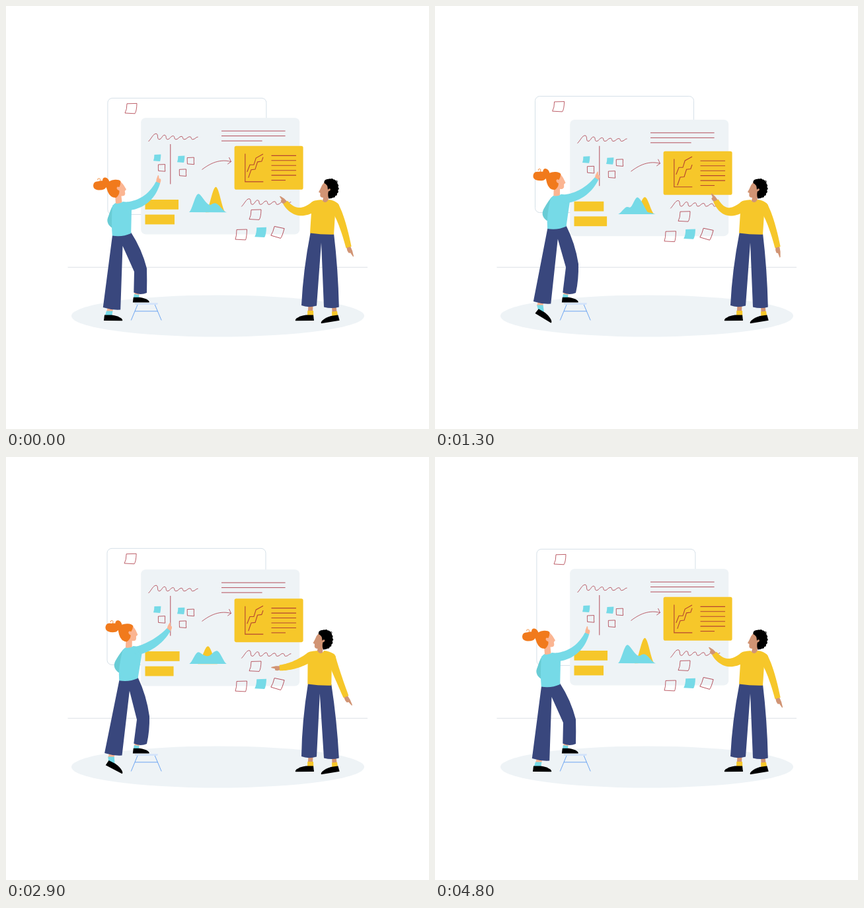
Animation, 640 px wide and 640 px high, one loop 4.9 s. Source, as an HTML page with a canvas:

```html
<!DOCTYPE html>
<html lang="en">
<head>
<meta charset="utf-8">
<title>Whiteboard session</title>
<style>
html, body { margin: 0; width: 100%; height: 100%; overflow: hidden; background: #fff; }
canvas { display: block; width: 640px; height: 640px; }
</style>
</head>
<body>
<canvas id="stage"></canvas>
<script>
const LOOP = 4900, SPAN = 4800, STEP = 100, RAD = Math.PI / 180;
const CYAN = '#76dae7', TEAL = '#69ccd5', NAVY = '#39477d', YELLOW = '#f6c72a', ORANGE = '#f17a1c';
const PEACH = '#fbb592', BROWN = '#d19474', PALE = '#eef3f6', INK = 'rgba(165,35,50,.8)';

const canvas = document.getElementById('stage');
const ctx = canvas.getContext('2d');
const ratio = window.devicePixelRatio || 1;
canvas.width = canvas.height = 640 * ratio;

const KEYS = [0, 400, 900, 1700, 2500, 2900, 3700, 4200];

// Periodic monotone spline through one value per key time.
function curve(...v) {
  const n = KEYS.length;
  const time = j => KEYS[(j + n) % n] + SPAN * Math.floor(j / n);
  const val = j => v[(j + n) % n];
  const slope = j => (val(j + 1) - val(j)) / (time(j + 1) - time(j));
  const tangent = j => {
    const a = slope(j - 1), b = slope(j);
    return a * b <= 0 ? 0 : 2 * a * b / (a + b);
  };
  return t => {
    t %= SPAN;
    const i = KEYS.filter(k => k <= t).length - 1;
    const d = time(i + 1) - time(i), s = (t - time(i)) / d, r = 1 - s;
    return val(i) * r * r * (1 + 2 * s) + val(i + 1) * s * s * (3 - 2 * s)
      + d * s * r * (tangent(i) * r - tangent(i + 1) * s);
  };
}

// Woman: leaning forward, rising on the toes
const lean = curve(0, -.2, .2, 1, .92, .77, .46, .4);
const rise = curve(0, -.04, .46, 1, 1, .72, .19, .05);
// Man: stepping toward the board, angle of the pointing forearm
const shift = curve(0, -.05, -.13, .22, .57, .74, 1, .6);
const raise = curve(34, 42, 53, 24, -13, -12, 6, 18);
// Chart: heights of the hills, place of the right one, growth of the bars
const leftHill = curve(28, 20, 11, 11, 17, 18, 21, 25);
const rightHill = curve(14, 17, 21, 26, 17, 20, 21, 18);
const rightSpot = curve(316, 311, 307, 307, 312, 319, 320, 318);
const backHill = curve(38.5, 34, 28, 24.5, 23, 27, 27.7, 33);
const growth = curve(0, 0, -1, -9.7, -1.7, 1.6, -1, 0);

const wave = t => (1 - Math.cos(2 * Math.PI * t / 2400)) / 2;
const ease = (a, b, t) => {
  const s = Math.max(0, Math.min(1, (t - a) / (b - a)));
  return s * s * (3 - 2 * s);
};
const bell = (x, a, c, b) => x < c ? ease(a, c, x) : ease(b, c, x);

function fill(color) { ctx.fillStyle = color; ctx.fill(); }
function stroke(color, width = 1) { ctx.strokeStyle = color; ctx.lineWidth = width; ctx.stroke(); }

function trace(...xy) {
  ctx.beginPath();
  for (let i = 0; i < xy.length; i += 2) ctx.lineTo(xy[i], xy[i + 1]);
}
function poly(color, ...xy) { trace(...xy); fill(color); }
function line(color, width, ...xy) { trace(...xy); stroke(color, width); }
function shape(d, color) { ctx.fillStyle = color; ctx.fill(new Path2D(d)); }
function sketch(d, color, width) {
  ctx.strokeStyle = color;
  ctx.lineWidth = width;
  ctx.stroke(new Path2D(d));
}
function ellipse(color, x, y, rx, ry = rx) {
  ctx.beginPath();
  ctx.ellipse(x, y, rx, ry, 0, 0, 7);
  fill(color);
}
function box(x, y, w, h, r) { ctx.beginPath(); ctx.roundRect(x, y, w, h, r); }

// Draws with the origin moved to x, y and turned.
function place(x, y, deg, draw) {
  ctx.save();
  ctx.translate(x, y);
  ctx.rotate(deg * RAD);
  draw();
  ctx.restore();
}

// Tapered arm through an elbow, with a rounded shoulder.
function limb(color, ax, ay, ex, ey, cx, cy, w0, w1, w2) {
  const bx = 2 * ex - (ax + cx) / 2, by = 2 * ey - (ay + cy) / 2;
  const left = [], right = [];
  for (let i = 0; i <= 24; i++) {
    const s = i / 24, r = 1 - s;
    const mix = (a, b, c) => a * r * r + 2 * b * r * s + c * s * s;
    const dx = (bx - ax) * r + (cx - bx) * s, dy = (by - ay) * r + (cy - by) * s;
    const k = mix(w0, w1, w2) / 2 / Math.hypot(dx, dy);
    const x = mix(ax, bx, cx), y = mix(ay, by, cy);
    left.push(x - dy * k, y + dx * k);
    right.unshift([x + dy * k, y - dx * k]);
  }
  ellipse(color, ax, ay, w0 / 2);
  poly(color, ...left, ...right.flat());
}

function hand(color, x, y, deg, len, side) {
  place(x, y, deg, () => {
    ctx.scale(1, side);
    poly(color, -2, -3, len * .45, -2.6, len - .6, -.9, len, .3, len * .55, 1.4, len * .5, 3.8, len * .25, 4.2, -2, 3);
  });
}

function shoe(x, y, deg, sx, sy = 1) {
  place(x, y, deg, () => {
    ctx.scale(sx, sy);
    shape('M-23-8.7L-12-8.8Q-3-7.500 2-4Q5-1.500 4 0L-24-.2Z', '#000');
  });
}

function sheet(x, y, s, skew, color, deg = 0) {
  place(x, y, deg, () => {
    ctx.beginPath();
    ctx.moveTo(skew, 0);
    ctx.lineTo(skew + s, -.4);
    ctx.quadraticCurveTo(skew + s - .3, s * .75, s, s);
    ctx.lineTo(0, s - .8);
    ctx.quadraticCurveTo(skew, s * .6, skew, 0);
    ctx.closePath();
    if (color) fill(color); else stroke(INK, .9);
  });
}

// A rising stroke that dies away in ripples.
function scribble(x, y) {
  ctx.beginPath();
  ctx.moveTo(x, y + 12);
  ctx.bezierCurveTo(x + 5, y + 7, x + 7, y + .5, x + 11.5, y + .2);
  for (let i = 0; i < 5; i++) {
    const px = x + 11.5 + 12.7 * i, dip = px + 4.8;
    const top = y + 5.5 - 5.3 * .6 ** i, next = y + 5.5 - 3.2 * .6 ** i;
    ctx.bezierCurveTo(px + 4, top, px + 1, y + 8.8, dip, y + 8.8);
    ctx.bezierCurveTo(dip + 3.5, y + 8.8, px + 9.5, next, px + 12.7, next);
  }
  stroke(INK, .9);
}

function drawBoards(t) {
  const k = wave(t), p = wave(t - 60);
  line('#dde1e6', 1, 93.5, 395.3, 547, 395.3);
  ellipse(PALE, 320.5, 469, 221.5, 31.5);

  place(-2.4 * k, -2.9 * k, 0, () => {
    box(153.9, 139.4, 240, 176, 7);
    fill('#fff');
    stroke('#d5e0e8', 1);
    sheet(180, 147.8, 15, 3);
  });

  place(0, 2.8 * k, 0, () => {
    box(204.2, 169.2, 240, 176.2, 7);
    fill(PALE);
    scribble(215.5, 193);
    scribble(356.3, 291.5);
    for (let i = 0; i < 3; i++) line(INK, 1, 326, 189.1 + 7.5 * i, i < 2 ? 422.6 : 387.6, 189.1 + 7.5 * i);
    line(INK, 1, 248.8, 209, 248.8, 269.5);
    sketch('M296.5 247.5C304 242 320 230 340.5 235.5M337.5 229L340.5 235.5L335.3 239.2', INK, .9);
    sheet(223, 225, 10, 1.4, CYAN);
    sheet(259, 227, 10, 1.4, CYAN);
    sheet(230.6, 240, 10.2, -.2);
    sheet(274.4, 229.5, 10.2, -.2);
    sheet(262.5, 247.3, 10.2, -.2);
    sheet(368, 308.4, 15, 3);
    sheet(347, 338.4, 15.5, 2);
    sheet(376.2, 335.2, 14.8, 3, CYAN);
    sheet(404.2, 333, 15.3, 2, null, 13.5);
  });

  place(0, 8 * p, 0, () => {
    box(345.6, 211.8, 104, 66, 2.8);
    fill(YELLOW);
    for (let i = 0; i < 6; i++) {
      const y = 226.3 + 7.45 * i;
      line(INK, 1.1, 401.5, y, i < 5 ? 439 : 423, y);
    }
    line(INK, 1.1, 361.8, 223.5, 361.8, 265.8, 389.3, 265.8);
    ctx.translate(0, -4 * p);
    line(INK, 1.1, 364.8, 251, 369, 240.3, 375, 240.3, 378.2, 230, 389, 224);
    ctx.translate(0, 7.5 * p);
    line(INK, 1.1, 366.7, 259.8, 371, 247.6, 377, 247, 380.5, 235.8, 386.8, 235, 389, 228.7);
  });
}

function hill(color, base, from, to, height) {
  ctx.beginPath();
  for (let x = from; x <= to; x += .5) ctx.lineTo(x, base - height(x));
  fill(color);
}

function drawChart(t) {
  const drop = 2.8 * wave(t), base = 312.3 + drop, grow = growth(t);
  ctx.fillStyle = YELLOW;
  ctx.fillRect(210.5, 293 + drop, 50.5 + grow, 14.8);
  ctx.fillRect(210.5, 315.6 + drop, 44.5 - .9 * grow, 14.8);

  const spot = 317.5 - 12 * (ease(1700, 2400, t) - ease(3700, 4700, t));
  const peak = rightSpot(t), a = leftHill(t), b = rightHill(t), c = backHill(t);
  hill(YELLOW, base, spot - 16, Math.min(331, spot + 16), x => c * bell(x, spot - 16, spot, spot + 15));
  hill(CYAN, base, 277, 334, x => Math.max(5 * Math.sin(Math.PI * (x - 277) / 57),
    a * bell(x, 276, 291, 311) + b * bell(x, 294, peak, Math.min(335, peak + 19))));
}

function drawStool() {
  poly('#d3e3fa', 194.5, 449.3, 230, 449.3, 229, 452, 195.5, 452);
  sketch('M199 452L189.3 475.5M225.3 452L235.2 475.5M195 461.8H229.6', '#609ff2', .9);
}

function womanHead(x, y, deg) {
  place(x, y, deg, () => {
    ctx.translate(-170, -293);
    shape('M165 286L166 299Q171 301 175.5 297L174.5 287.5Q180 288 180.3 284L179.8 280L182 277.5Q178 270 173 265L163 272Z', PEACH);
    shape('M151 271Q155 263.5 165 262.8Q171 262.5 173.3 265Q173.5 270 171.5 274Q167.5 272.5 167.5 276Q168.5 279 171.5 279.5Q172 286 166.5 290Q158 290.5 154 281Q152 276 151 271Z', ORANGE);
    shape('M132 271.5Q132.5 265 140 265.3Q145 264 146 264.5Q146 259 150.5 259.5Q155 260.5 156.5 266L155 271Q151 275 149 277Q143 279.5 137 278Q132 276.5 132 271.5Z', ORANGE);
    sketch('M142 265.5Q143.5 260.8 140.5 260.8Q137.8 261.3 139 263.5', ORANGE, .8);
  });
}

function drawWoman(t) {
  const l = lean(t), up = rise(t);
  const x = 170 + 20.3 * l, y = 293 - 14 * up;
  const hx = 175 + 13.5 * l, hy = 346 - 13 * up;
  const kx = 213 + 4 * Math.min(1, 2 * l), ky = 397 - 7 * up + 8 * (l - up);
  const mx = 160 + 3 * l, my = 458 - 11 * up;
  const ex = 212 + 17.5 * l, ey = 292 - 14.5 * l;
  const wx = 230 + 21 * l, wy = 267 - 10.5 * l * up;

  // Far arm, tucked behind the back
  ctx.beginPath();
  ctx.moveTo(x - 4, y + 5);
  ctx.quadraticCurveTo(x - 10, y + 8, hx - 20, hy - 28);
  ctx.quadraticCurveTo(hx - 25, hy - 18, hx - 15, hy - 10.5);
  ctx.lineTo(hx - 10, hy - 14);
  fill(TEAL);

  // Feet
  const foot = 38 * up, c = Math.cos(foot * RAD), s = Math.sin(foot * RAD), toe = 476.3 + 1.5 * up;
  const spot = (u, v) => [172 + u * c - v * s, toe + u * s + v * c];
  const ax = mx - 3.5, ay = my + 3.5;
  poly(PEACH, mx - 6, my - 2, mx + 3, my - 2, ax + 4.5, ay + 1, ax - 4.5, ay + 1);
  poly(CYAN, ax - 4.5, ay, ax + 5, ay, ...spot(-12, -7), ...spot(-22.5, -7));
  shoe(172, toe, foot, 1);
  poly(PEACH, 195, 432, 202, 432, 201.5, 437.5, 194, 437);
  poly(CYAN, 193.8, 436, 201.5, 437, 201, 442, 193, 442);
  shoe(213, 448.6, 0, .88, .9);

  // Trousers
  ctx.beginPath();
  ctx.moveTo(hx - 14, hy + 1);
  ctx.lineTo(mx - 13.2, my - 2);
  ctx.quadraticCurveTo(mx, my + 2.3, mx + 13.2, my + 1.5);
  ctx.lineTo(hx + 1.5, hy + 17);
  ctx.lineTo(kx - 19, ky + 5);
  ctx.lineTo(193.3, 433.5);
  ctx.quadraticCurveTo(203, 438, 213, 434);
  ctx.quadraticCurveTo(kx + .5, 415, kx, ky);
  ctx.quadraticCurveTo((hx + 14 + kx) / 2 + 4.5, (hy - 2 + ky) / 2 - 3, hx + 13.8, hy - 4);
  fill(NAVY);

  womanHead(x, y, 9 * l);

  // Sweater
  ctx.beginPath();
  ctx.moveTo(x - 5, y + 5.5);
  ctx.quadraticCurveTo(x + 2, y + 7, x + 7, y + 3);
  ctx.lineTo(x + 14, y + 3.8);
  ctx.lineTo(x + 20, y + 14);
  ctx.lineTo(hx + 14.2, hy - 2);
  ctx.quadraticCurveTo(hx + 1, hy + 4, hx - 14.2, hy + 1.5);
  ctx.quadraticCurveTo(hx - 16, hy - 18, x - 9, y + 9);
  fill(CYAN);

  hand(PEACH, wx, wy, -87 + 12 * l, 11, 1);
  limb(CYAN, x + 14, y + 10, ex, ey, wx, wy, 13, 14, 6.8);
}

function manHead(dx) {
  place(dx, 0, 0, () => {
    shape('M483 265Q478 270 475.5 277L473 281.5L475.5 283L475.3 287Q476 290 480 290L478.5 297Q483 300 487.5 296.5L488 289L494 280L490 268Z', BROWN);
    shape('M481.5 268Q480.5 263 486 262Q494 260 500 265Q504 272 502 282Q498 291 488.5 291.5Q486.500 287 487.8 280.5Q491.5 279.5 490.8 276.7Q488.5 275.5 487 278Q487 270 481.5 268Z', '#000');
    for (let i = 0; i < 10; i++) {
      const a = -2.2 + i * .37;
      ellipse('#000', 492 + 9.6 * Math.cos(a), 276 + 13 * Math.sin(a), 2);
    }
    sketch('M499 264.8Q502 263.5 501.5 266.5', '#000', .8);
  });
}

function drawMan(t) {
  const step = shift(t), angle = raise(t);
  const front = -9.2 * step, back = -7 * step, hip = -5 * step;
  const ex = 443 - 7 * step, ey = 311 + 4 * step;
  const wx = ex - 24.5 * Math.cos(angle * RAD), wy = ey - 24.5 * Math.sin(angle * RAD);
  const cx = 518.5 - 5.5 * step, cy = 365 - 3 * step;
  const swing = 26 - 14 * Math.sin(2 * Math.PI * t / SPAN);

  poly(BROWN, 457.5, 453, 464.5, 453, 464, 462, 456.8, 462);
  poly(YELLOW, 456.3, 461, 465, 461, 465.3, 468.5, 456, 468.5);
  shoe(442, 476.2, 0, -1);
  poly(BROWN, 493, 454, 499.5, 454, 500.5, 463, 493.5, 463);
  poly(YELLOW, 493, 462.5, 501, 461.8, 502, 468.5, 493.3, 470);
  shoe(481, 479.6, -9, -1);

  ctx.beginPath();
  ctx.moveTo(460.8 + hip, 342);
  ctx.quadraticCurveTo(449.5 + hip / 2, 400, 447, 453);
  ctx.quadraticCurveTo(457, 457, 470, 453.5);
  ctx.lineTo(477 + hip * .6, 358);
  ctx.lineTo(481, 455.5);
  ctx.quadraticCurveTo(493, 458.5, 503.8, 455.5);
  ctx.quadraticCurveTo(502.5 + hip * .5, 398, 496 + hip, 344);
  fill(NAVY);

  hand(BROWN, cx, cy, 90 - swing, 16, 1);
  limb(YELLOW, 497 + back, 303.5, 508 - 9 * step, 328 + 2 * step, cx, cy, 14, 11, 8.5);
  hand(BROWN, wx, wy, 194 + angle, 12.8, -1);
  limb(YELLOW, 468 + front, 302, ex, ey, wx, wy, 15, 12, 8.5);

  manHead(-11.5 * step);

  ctx.beginPath();
  ctx.moveTo(466 + front, 295);
  ctx.quadraticCurveTo(472 + front, 292.8, 478 + front, 293.2);
  ctx.quadraticCurveTo(483 + front, 301, 488 + front, 293);
  ctx.quadraticCurveTo(496 + front, 293.5, 500 + back, 297.5);
  ctx.lineTo(498 + back, 314);
  ctx.lineTo(496 + hip, 345.8);
  ctx.quadraticCurveTo(478 + hip, 346.2, 460 + hip, 343.6);
  ctx.lineTo(462 + front * .8, 312);
  fill(YELLOW);
}

function draw(now) {
  const t = Math.min(SPAN, Math.floor(now % LOOP / STEP) * STEP);
  ctx.setTransform(ratio, 0, 0, ratio, 0, 0);
  ctx.fillStyle = '#fff';
  ctx.fillRect(0, 0, 640, 640);
  drawBoards(t);
  drawChart(t);
  drawStool();
  drawWoman(t);
  drawMan(t);
}

let start;
function tick(now) {
  if (start === undefined) start = now;
  draw(Math.max(0, now - start));
  requestAnimationFrame(tick);
}
draw(0);
requestAnimationFrame(tick);
</script>
</body>
</html>
```
